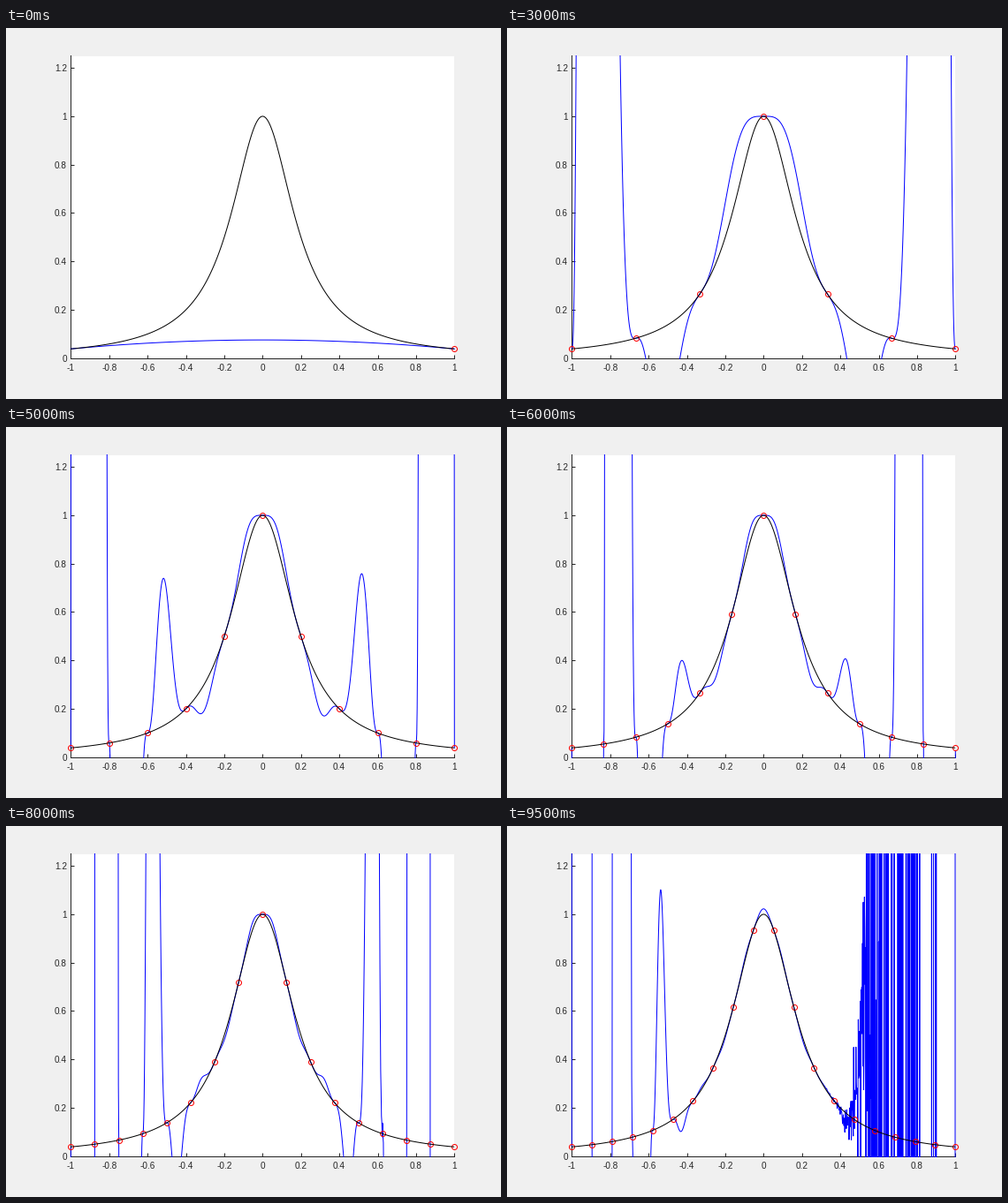
Animation, 560 px wide and 420 px high, one loop 10000 ms. Source, as a matplotlib script:

```python
import numpy as np
import matplotlib.pyplot as plt
from matplotlib.animation import FuncAnimation
from matplotlib.patches import Rectangle

WIDTH, HEIGHT, DPI = 560, 420, 100
PX = 72 / DPI  # points per pixel
LEFT, RIGHT, TOP, BOTTOM = 73.3, 507.3, 31.5, 373.8
INK = "#262626"
FRAMES = 20

plt.rcParams.update({
    "font.family": "Liberation Sans",
    "font.size": 10 * PX,
    "path.simplify": False,
})


def runge(x):
    return 1 / (1 + 25 * x**2)


def slope(x):
    return -50 * x / (1 + 25 * x**2) ** 2


def nodes(n):
    if n == 1:
        return np.array([1.0])
    return -1 + 2 * np.arange(n) / (n - 1)


def newton_coefficients(z):
    """Divided differences on tripled nodes, with f' in both derivative slots."""
    column = runge(z)
    coefficients = [column[0]]
    for order in range(1, len(z)):
        gap = z[order:] - z[:-order]
        same = gap == 0
        ratio = np.diff(column) / np.where(same, 1, gap)
        column = np.where(same, slope(z[order:]) / order, ratio)
        coefficients.append(column[0])
    return coefficients


def interpolate(n, x):
    """Newton sum; its rounding noise at high degree is part of the picture."""
    z = np.repeat(nodes(n), 3)
    value = np.zeros_like(x)
    for k, coefficient in enumerate(newton_coefficients(z)):
        term = np.ones_like(x)
        for node in z[:k][::-1]:
            term *= x - node
        value += coefficient * term
    return value


def pixel_box(left, top, right, bottom):
    """Figure-relative origin, width and height of a box given in pixels."""
    return (left / WIDTH, 1 - bottom / HEIGHT,
            (right - left) / WIDTH, (bottom - top) / HEIGHT)


fig = plt.figure(figsize=(WIDTH / DPI, HEIGHT / DPI), dpi=DPI, facecolor="#f0f0f0")
ax = fig.add_axes(pixel_box(LEFT, TOP, RIGHT, BOTTOM))
ax.set(xlim=(-1, 1), ylim=(0, 1.25))


def ticks(first, last):
    values = np.arange(first, last + 1) / 5
    return values, [f"{v:g}" for v in values]


for set_ticks, span in ((ax.set_xticks, (-5, 5)), (ax.set_yticks, (0, 6))):
    set_ticks(*ticks(*span))
ax.tick_params(direction="in", length=4.3 * PX, width=PX, color=INK, labelcolor=INK)
ax.tick_params(axis="x", pad=6 * PX)
ax.tick_params(axis="y", pad=4.5 * PX)
ax.spines[["top", "right"]].set_visible(False)
for side in ("left", "bottom"):
    ax.spines[side].set(linewidth=PX, color=INK)

xs = np.linspace(-1, 1, 1000)
fit, = ax.plot([], [], color="blue", lw=PX, zorder=2.6)
dots, = ax.plot([], [], "o", ms=6 * PX, mew=PX, mfc="none", mec="red",
                clip_on=False, zorder=2.7)
ax.plot(xs, runge(xs), color="black", lw=PX, zorder=2.8)

# Let the fit keep its full line width along the plot's edges.
x0, y0, w, h = pixel_box(72, 31, 508, 375)
fit.set_clip_path(Rectangle((x0, y0), w, h, transform=fig.transFigure))


def draw(frame):
    n = frame + 1
    points = nodes(n)
    dots.set_data(points, runge(points))
    fit.set_data(xs, interpolate(n, xs))
    return dots, fit


animation = FuncAnimation(fig, draw, frames=FRAMES, interval=500, repeat=True,
                          repeat_delay=0)
plt.show()
```
